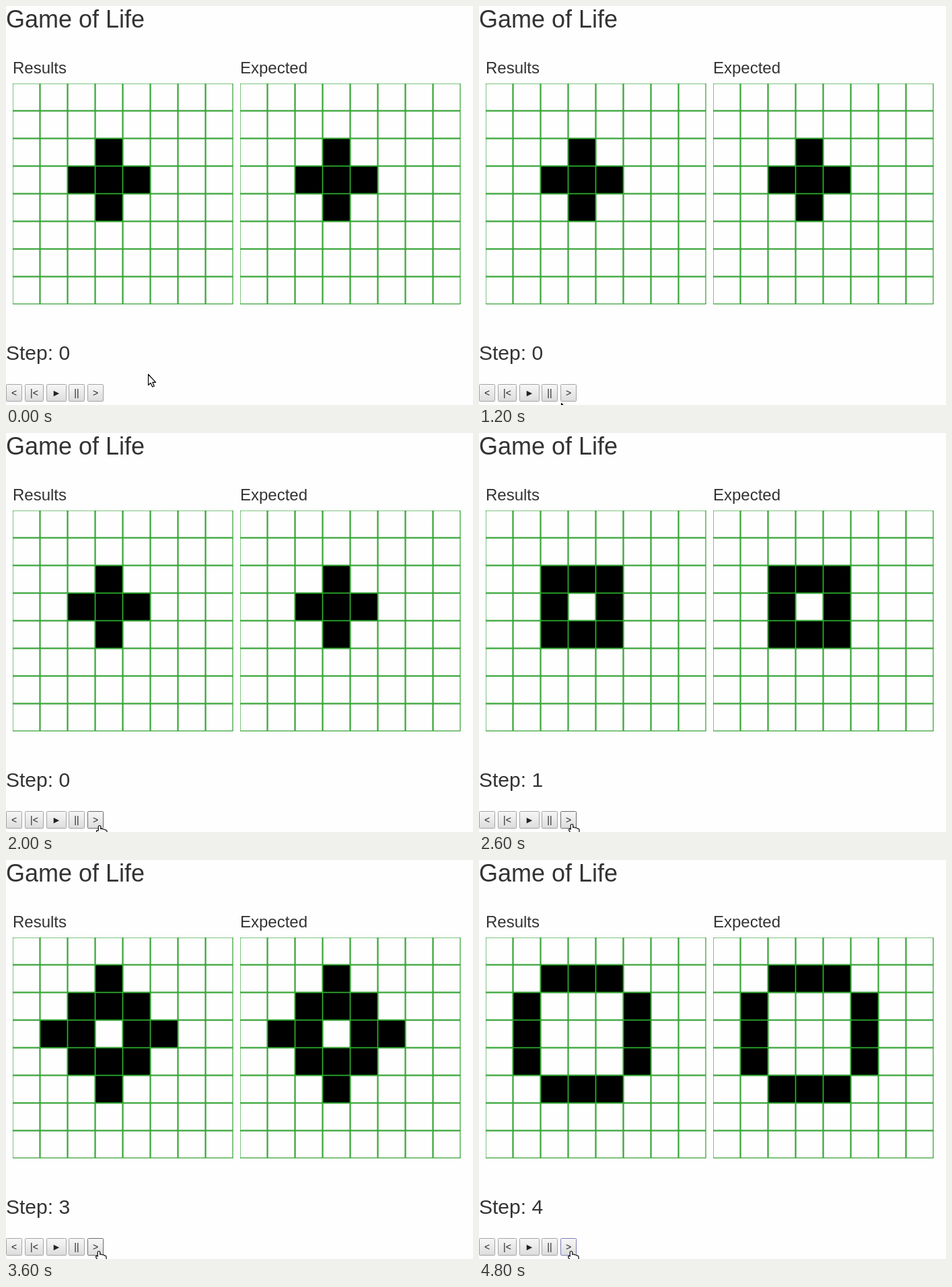
An HTML page that plays this animation: 694x592 px, repeating every 5000 ms.

```html
<!DOCTYPE html>
<html lang="en">
<head>
<meta charset="utf-8">
<title>Game of Life</title>
<style>
  html, body { margin: 0; width: 100%; height: 100%; overflow: hidden; background: #fefefe; }
  svg { display: block; }
  text { font-family: "Liberation Sans", Arial, sans-serif; fill: #333; }
  .label { font-size: 14px; text-anchor: middle; fill: #222; }
  .cell { fill: #fefefe; stroke: #008c00; stroke-width: 1; }
  .alive { fill: #000; }
  .button rect { fill: url(#up); stroke: #a4a4a4; }
  .button.hover rect { stroke: #6c6c6c; }
  .button.down rect { fill: url(#down); stroke: #a4a4a4; }
  .button.focus rect { stroke: #7d7db8; }
  .pointer { fill: #fff; stroke: #000; stroke-width: 1.2; stroke-linejoin: round; }
</style>
</head>
<body>
<svg id="stage" width="694" height="592" viewBox="0 0 694 592">
  <defs>
    <linearGradient id="up" x2="0" y2="1">
      <stop offset="0" stop-color="#f7f7f7"/><stop offset="1" stop-color="#dcdcdc"/>
    </linearGradient>
    <linearGradient id="down" x2="0" y2="1">
      <stop offset="0" stop-color="#dadada"/><stop offset="1" stop-color="#ececec"/>
    </linearGradient>
  </defs>
  <text x="0" y="32" font-size="36">Game of Life</text>
  <text x="10" y="100" font-size="24">Results</text>
  <text x="348" y="100" font-size="24">Expected</text>
  <text id="step" x="0" y="525" font-size="30">Step: 0</text>
</svg>
<script>
const LOOP = 5000, TICK = 200, SIZE = 8, PITCH = 41, CELL = 40;
const stage = document.getElementById('stage');
const stepText = document.getElementById('step');

function add(parent, tag, attrs, text) {
  const el = document.createElementNS('http://www.w3.org/2000/svg', tag);
  for (const key in attrs) el.setAttribute(key, attrs[key]);
  if (text) el.textContent = text;
  parent.appendChild(el);
  return el;
}

// Cells sit one pixel apart, so neighbouring soft strokes merge into one line.
function makeBoard(x) {
  const side = SIZE * PITCH;
  const box = add(stage, 'svg', { x, y: 115, width: side, height: side });
  return Array.from({ length: SIZE * SIZE }, (_, i) => add(box, 'rect', {
    class: 'cell', x: i % SIZE * PITCH, y: Math.floor(i / SIZE) * PITCH, width: CELL, height: CELL
  }));
}
const boards = [makeBoard(10), makeBoard(348)];

function evolve(cells) {
  const at = (x, y) => x >= 0 && y >= 0 && x < SIZE && y < SIZE && cells[y * SIZE + x] ? 1 : 0;
  return cells.map((alive, i) => {
    const x = i % SIZE, y = Math.floor(i / SIZE);
    let n = -at(x, y);
    for (let dy = -1; dy <= 1; dy++)
      for (let dx = -1; dx <= 1; dx++) n += at(x + dx, y + dy);
    return n === 3 || (alive && n === 2);
  });
}

const clicks = [2400, 3000, 3600, 4400];
const plus = Array.from({ length: SIZE * SIZE }, (_, i) =>
  Math.abs(i % SIZE - 3) + Math.abs(Math.floor(i / SIZE) - 3) <= 1);
const generations = [plus];
for (const _ of clicks) generations.push(evolve(generations.at(-1)));

// Buttons: left edge, width, label
const buttons = [
  [0, 24, '<'], [28, 28, '|<'], [60, 30, '►'], [93, 24, '||'], [121, 24, '>']
].map(([x, w, label]) => {
  const g = add(stage, 'g', { class: 'button' });
  add(g, 'rect', { x: x + 0.5, y: 561.5, width: w - 1, height: 25, rx: 1 });
  add(g, 'text', { class: 'label', x: x + w / 2, y: 579 }, label);
  return g;
});
const pauseButton = buttons[3], nextButton = buttons[4];

const arrow = add(stage, 'path', {
  class: 'pointer', d: 'M.5 .5V16.5L4 13.3L6.6 19L9.2 18L6.8 12.3H11.5Z'
});
const hand = add(stage, 'path', {
  class: 'pointer',
  d: 'M-1.8 8V2Q-1.8 .5 0 .5Q1.8 .5 1.8 2V5.5Q4 4.3 5.2 6Q7.4 5.2 8.2 7Q11 6.6 11 9.5V16H0L-4.4 9.5Q-4.6 6.5-1.8 8Z'
});

// Pointer path: time, x, y
const path = [
  [0, 211, 546], [200, 203, 549], [400, 175, 559], [600, 138, 566], [800, 103, 585],
  [1000, 108, 588], [1200, 122, 589], [1400, 136, 587], [1600, 139, 584],
  [2000, 139, 582], [2400, 138, 580], [4000, 138, 580], [4200, 137, 580], [5000, 137, 580]
];
function pointerAt(t) {
  const k = path.findIndex(p => p[0] > t);
  const a = path[k - 1], b = path[k], u = (t - a[0]) / (b[0] - a[0]);
  return [1, 2].map(i => Math.round(a[i] + (b[i] - a[i]) * u));
}

function draw(time) {
  const t = Math.floor(time % LOOP / TICK) * TICK;
  const step = clicks.filter(c => c <= t).length;
  const overNext = t >= 1400;

  for (const board of boards)
    board.forEach((cell, i) => cell.classList.toggle('alive', generations[step][i]));
  stepText.textContent = 'Step: ' + step;

  pauseButton.classList.toggle('hover', t === 800);
  nextButton.classList.toggle('hover', overNext);
  nextButton.classList.toggle('down', clicks.includes(t + TICK));
  nextButton.classList.toggle('focus', t >= 4600);

  arrow.style.display = overNext ? 'none' : '';
  hand.style.display = overNext ? '' : 'none';
  (overNext ? hand : arrow).setAttribute('transform', `translate(${pointerAt(t)})`);
}

const start = performance.now();
function frame() {
  draw(performance.now() - start);
  requestAnimationFrame(frame);
}
frame();
</script>
</body>
</html>
```
